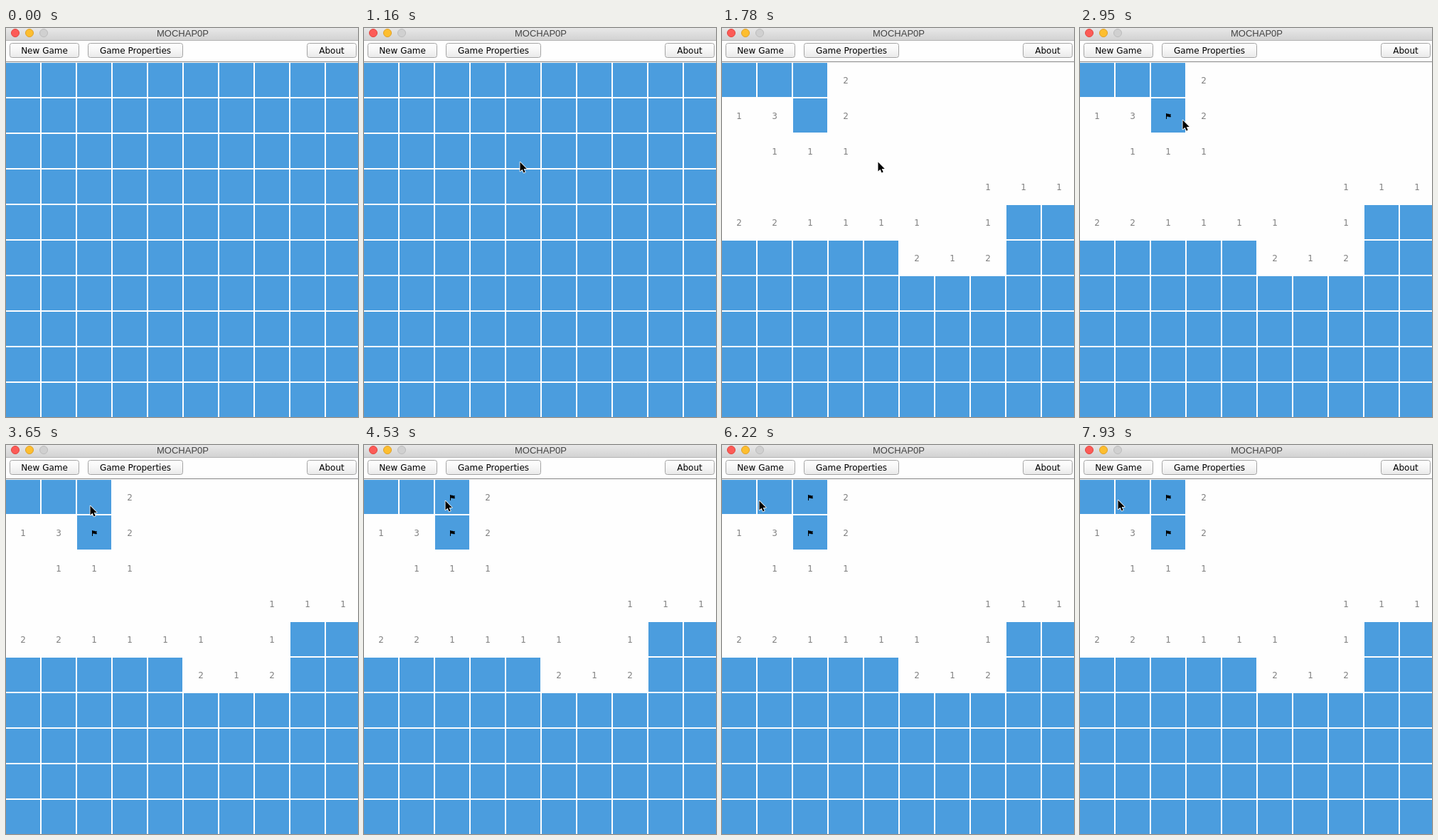
Animation, 495 px wide and 547 px high, one loop 8 s. Source, as an HTML page:

```html
<!DOCTYPE html>
<html lang="en">
<head>
<meta charset="utf-8">
<title>MOCHAP0P</title>
<style>
  html, body { margin: 0; width: 100%; height: 100%; overflow: hidden; background: #fefefe; }
  svg { display: block; width: 495px; height: 547px; }
  text { text-anchor: middle; font: 12px "DejaVu Sans", sans-serif; }
  .title { font: 13px "Liberation Sans", Arial, sans-serif; fill: #444; }
  .label { fill: #000; }
  .button { fill: url(#face); stroke: #a3a3a3; }
  .tile { fill: #4b9dde; }
  .count { fill: #808080; }
  .cursor { fill: #000; stroke: #fff; stroke-width: 1.6; stroke-linejoin: round; paint-order: stroke; }
</style>
</head>
<body>
<svg id="stage" viewBox="0 0 495 547">
  <defs>
    <linearGradient id="bar" x2="0" y2="1">
      <stop stop-color="#e8e8e8"/><stop offset="1" stop-color="#d2d2d2"/>
    </linearGradient>
    <linearGradient id="face" x2="0" y2="1">
      <stop stop-color="#fff"/><stop offset=".5" stop-color="#f6f6f6"/><stop offset="1" stop-color="#e9e9e9"/>
    </linearGradient>
  </defs>
  <rect width="495" height="547" fill="#fefefe"/>
  <rect width="495" height="17" fill="url(#bar)"/>
  <rect y="17" width="495" height="1" fill="#b4b4b4"/>
  <rect y="47" width="495" height="1" fill="#858585"/>
  <circle cx="13" cy="7" r="5.5" fill="#fc5b57" stroke="#e2463f"/>
  <circle cx="33" cy="7" r="5.5" fill="#fdbe2f" stroke="#e0a028"/>
  <circle cx="53" cy="7" r="5.5" fill="#d0d0d0" stroke="#bcbcbc"/>
  <text class="title" x="248.5" y="12">MOCHAP0P</text>
</svg>
<script>
const LOOP = 8000, FIRST_OPEN = 1690, ALL_OPEN = 1780, STEP = 86;
const SIZE = 10, PITCH = 50, TOP = 49;
const stage = document.getElementById("stage");

function add(name, attrs, text = "") {
  const el = document.createElementNS("http://www.w3.org/2000/svg", name);
  for (const key in attrs) el.setAttribute(key, attrs[key]);
  el.textContent = text;
  return stage.appendChild(el);
}

function addButton(label, x, width) {
  add("rect", { class: "button", x: x + .5, y: 21.5, width: width - 1, height: 20, rx: 3 });
  add("text", { class: "label", x: x + width / 2, y: 36 }, label);
}
addButton("New Game", 5, 98);
addButton("Game Properties", 115, 134);
addButton("About", 423, 70);

// Cells are keyed by their row and column digits
const mines = new Set("00 02 12 48 50 51 54 66".split(" "));
const early = new Set("04 11 20 22 25 26 29 33 37 38 42 45".split(" "));
const opened = new Map();

function neighbours(r, c) {
  const cells = [];
  for (let y = Math.max(0, r - 1); y <= Math.min(SIZE - 1, r + 1); y++)
    for (let x = Math.max(0, c - 1); x <= Math.min(SIZE - 1, c + 1); x++) cells.push([y, x]);
  return cells;
}

// Opening an empty cell opens everything around it
function open(r, c) {
  const key = `${r}${c}`;
  if (opened.has(key)) return;
  const around = neighbours(r, c);
  const count = around.filter(([y, x]) => mines.has(`${y}${x}`)).length;
  opened.set(key, count);
  if (!count) around.forEach(([y, x]) => open(y, x));
}
open(2, 4);

const parts = []; // shown from `from` until `to`
for (let r = 0; r < SIZE; r++) for (let c = 0; c < SIZE; c++) {
  const key = `${r}${c}`, count = opened.get(key);
  const time = !opened.has(key) ? LOOP : early.has(key) ? FIRST_OPEN : ALL_OPEN;
  const x = c * PITCH, y = TOP + r * PITCH;
  parts.push({ el: add("rect", { class: "tile", x, y, width: 48, height: 48 }), from: 0, to: time });
  if (count) parts.push({ el: add("text", { class: "count", x: x + 24, y: y + 29 }, count), from: time, to: LOOP });
}

function addFlag(r, c, from) {
  const el = add("path", {
    d: "M0 0H1V.7Q2.5 .2 4 1Q5.5 1.7 7 1L6.3 3L7 5Q5.5 5.7 4 5Q2.5 4.3 1 4.8V8H0Z",
    transform: `translate(${c * PITCH + 21} ${TOP + r * PITCH + 21})`
  });
  parts.push({ el, from, to: LOOP });
}
addFlag(1, 2, 2950);
addFlag(0, 2, 4530);

const cursor = add("path", { class: "cursor", d: "M.5 .5V13.5L3.5 10.8L5.6 15.5L7.7 14.6L5.7 10H9.8Z" });

// Each move slows toward its end point; a higher power brakes harder
const entry = [487, 205];
const moves = [
  { at: 720, steps: 6, to: [219, 188], power: 2 },
  { at: 2230, steps: 4, to: [144, 129], power: 1.5 },
  { at: 3300, steps: 8, to: [114, 78], power: 2 },
  { at: 5340, steps: 7, to: [51, 78], power: 1.25 },
  { at: 6220, steps: 1, to: [52, 78], power: 1 },
  { at: 6490, steps: 1, to: [53, 78], power: 1 },
  { at: 7930, steps: 1, to: [53, 77], power: 1 }
];

function pointer(t) {
  let pos = entry;
  for (const { at, steps, to, power } of moves) {
    if (t < at) break;
    const done = Math.min(steps, Math.floor((t - at) / STEP) + 1) / steps;
    const left = (1 - done) ** power;
    pos = to.map((end, i) => Math.round(end + (pos[i] - end) * left));
  }
  return pos;
}

const show = (el, on) => el.setAttribute("visibility", on ? "visible" : "hidden");

function draw(t) {
  for (const { el, from, to } of parts) show(el, t >= from && t < to);
  show(cursor, t >= moves[0].at);
  cursor.setAttribute("transform", `translate(${pointer(t).join(" ")})`);
}

const start = performance.now();
function tick() {
  draw((performance.now() - start) % LOOP);
  requestAnimationFrame(tick);
}
tick();
</script>
</body>
</html>
```
